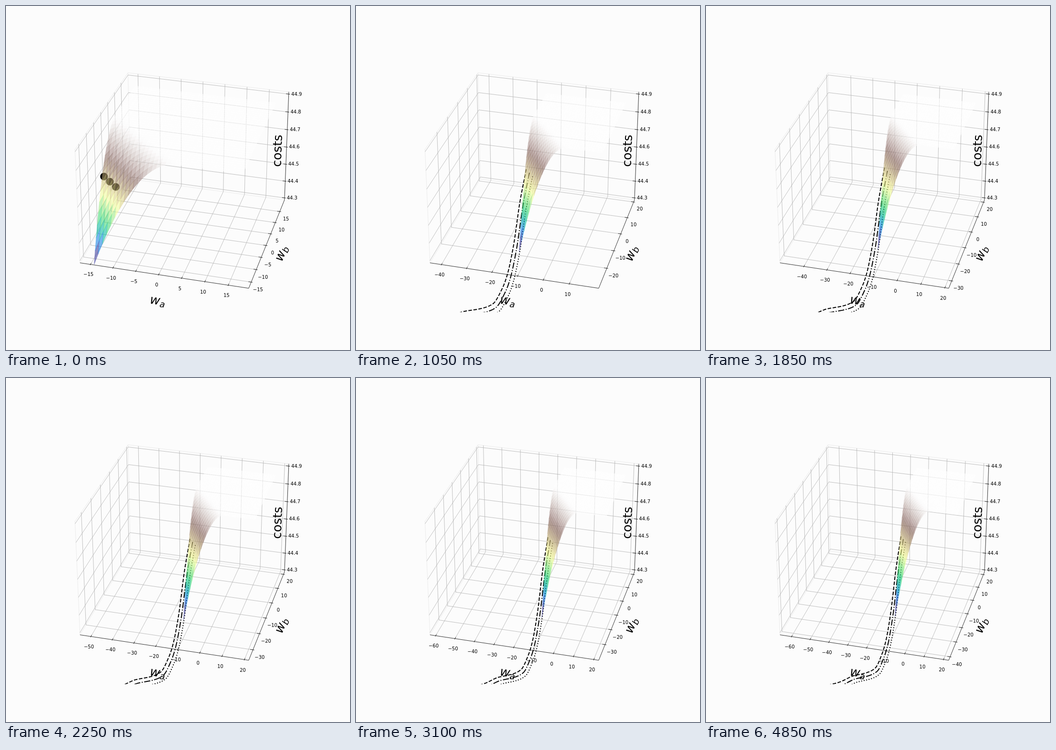
An HTML page with a canvas that plays this animation: 720 by 720 pixels, repeating every 4.9 s.

```html
<!DOCTYPE html>
<html lang="en">
<head>
<meta charset="utf-8">
<title>Cost surface</title>
<style>
  html, body { margin: 0; width: 720px; height: 720px; overflow: hidden; background: #fcfcfc; }
  canvas { display: block; }
</style>
</head>
<body>
<canvas id="plot" width="720" height="720"></canvas>
<script>
const ctx = document.getElementById('plot').getContext('2d');
const LOOP = 4900, STEP = 50;

// Box: half sizes of the panes, and full sizes of the data range
const W = 8 / 7, H = 6 / 7, P = W * 25 / 48, Q = H * 25 / 48;
const AZ = -75 * Math.PI / 180, EL = 30 * Math.PI / 180;
const ca = Math.cos(AZ), sa = Math.sin(AZ), ce = Math.cos(EL), se = Math.sin(EL);

function project([x, y, z]) {
  const u = -sa * x + ca * y;
  const v = -ca * se * x - sa * se * y + ce * z;
  const k = 2996.8 / (10 - (ca * ce * x + sa * ce * y + se * z));
  return [376.5 + u * k, 356.1 - v * k];
}

// Monotone cubic interpolation
function spline(xs, ys) {
  const n = xs.length;
  const d = xs.slice(1).map((x, i) => (ys[i + 1] - ys[i]) / (x - xs[i]));
  const m = xs.map((_, i) => {
    if (i === 0) return d[0];
    if (i === n - 1) return d[n - 2];
    const a = d[i - 1], b = d[i];
    return a * b > 0 ? 2 * a * b / (a + b) : 0;
  });
  return x => {
    let i = 0;
    while (i < n - 2 && x > xs[i + 1]) i++;
    const h = xs[i + 1] - xs[i], t = (x - xs[i]) / h, r = 1 - t;
    return ys[i] * (1 + 2 * t) * r * r + ys[i + 1] * (3 - 2 * t) * t * t
      + h * t * r * (m[i] * r - m[i + 1] * t);
  };
}

// Descent: how far along, and the track as functions of distance in -wa
const travel = spline(
  [0, 100, 200, 300, 500, 750, 1050, 1850, 2250, 3100, 3900, 4850],
  [14.5, 17, 20.5, 25, 31.5, 36.5, 40.4, 45.85, 50.2, 57.5, 59.4, 60.6]);
const way = [14.5, 16.5, 18.5, 20.5, 22, 25, 28.7, 36, 42, 50.2, 57.5, 59.4, 60.6];
const trackY = spline(way,
  [-7.8, -9.6, -11.5, -13.5, -15, -17.5, -19, -20.7, -25.2, -29, -32.6, -33.45, -34.6]);
const trackZ = spline(way,
  [.085, -.164, -.5, -.73, -.826, -.932, -.96, -.987, -1, -1.01, -1.015, -1.018, -1.02]);
const DASHES = [[7.4, 3.2], [12.8, 3.2, 2, 3.2], [2, 3.3]];
const GAP = [1.85, -1.8];

const X0 = -15, X1 = 17, Y0 = -15, Y1 = 18, Z_LOW = 44.317, Z_TOP = 44.87;
const cost = (x, y) => Z_TOP - .617 * Math.max(0, (-x - y - 12) / 18) ** 1.93;
const boxZ = z => (z - 44.6) / .6 * H;

const TERRAIN = [[0, 51, 51, 153], [.15, 0, 153, 255], [.25, 0, 204, 102],
  [.5, 255, 255, 153], [.75, 128, 92, 84], [1, 255, 255, 255]];
function terrain(f) {
  f = Math.min(1, Math.max(0, f));
  let i = 0;
  while (i < 4 && f > TERRAIN[i + 1][0]) i++;
  const a = TERRAIN[i], b = TERRAIN[i + 1], t = (f - a[0]) / (b[0] - a[0]);
  return `rgb(${[1, 2, 3].map(j => Math.round(a[j] + (b[j] - a[j]) * t))})`;
}

// Data range with a 5% margin on both sides
function axis(min, max) {
  const pad = (max - min) * .05, lo = min - pad, hi = max + pad;
  const step = hi - lo > 45 ? 10 : 5, ticks = [];
  for (let v = Math.ceil(lo / step) * step; v <= hi; v += step) ticks.push(v);
  return { ticks, map: v => ((v - lo) / (hi - lo) - .5) * W };
}

function trace(points) {
  ctx.beginPath();
  points.forEach(p => ctx.lineTo(...project(p)));
}

function line(color, width, ...points) {
  ctx.strokeStyle = color;
  ctx.lineWidth = width;
  trace(points);
  ctx.stroke();
}

const grid = (...points) => line('#b0b0b0', .8, ...points);
const mark = (...points) => line('#000', .8, ...points);

function tickLabel(text, p) {
  const [x, y] = project(p);
  ctx.fillText(text, x, y + 7.8);
}

function drawAxes(ax, ay) {
  const edge = '#ececec', out = W / 120, inn = W / 60, dw = .0474, dh = .0356;
  line(edge, 1, [-P, -P, -Q], [-P, -P, Q], [-P, P, Q], [P, P, Q]);
  line(edge, 1, [-P, -P, -Q], [-P, P, -Q], [P, P, -Q]);
  line(edge, 1, [-P, P, -Q], [-P, P, Q]);

  const zTicks = [...Array(7).keys()].map(i => 44.3 + i / 10);
  ax.ticks.map(ax.map).forEach(s => grid([s, -P, -Q], [s, P, -Q], [s, P, Q]));
  ay.ticks.map(ay.map).forEach(t => grid([P, t, -Q], [-P, t, -Q], [-P, t, Q]));
  zTicks.map(boxZ).forEach(z => grid([P, P, z], [-P, P, z], [-P, -P, z]));

  mark([-P, -P, -Q], [P, -P, -Q]);
  mark([P, -P, -Q], [P, P, -Q]);
  mark([P, P, -Q], [P, P, Q]);

  ctx.fillStyle = '#000';
  ctx.textAlign = 'center';
  ctx.font = '10px "DejaVu Sans", sans-serif';
  const name = v => String(v).replace('-', '\u2212');
  for (const v of ax.ticks) {
    const s = ax.map(v);
    mark([s, -P + inn, -Q], [s, -P - out, -Q]);
    tickLabel(name(v), [s, -P - dw, -Q - dh]);
  }
  for (const v of ay.ticks) {
    const t = ay.map(v);
    mark([P - inn, t, -Q], [P + out, t, -Q]);
    tickLabel(name(v), [P + dw, t, -Q - dh]);
  }
  for (const v of zTicks) {
    const z = boxZ(v);
    mark([P - inn, P, z], [P + out, P, z]);
    tickLabel(v.toFixed(1), [P + dw, P + dw, z]);
  }
}

function turned(x, y, degrees, draw) {
  ctx.save();
  ctx.translate(x, y);
  ctx.rotate(degrees * Math.PI / 180);
  draw();
  ctx.restore();
}

function weight(sub, x, y, degrees) {
  turned(x, y, degrees, () => {
    ctx.textAlign = 'left';
    ctx.font = 'italic 26px "DejaVu Sans", sans-serif';
    ctx.fillText('w', -16, 6);
    ctx.font = 'italic 18.2px "DejaVu Sans", sans-serif';
    ctx.fillText(sub, 5.3, 10);
  });
}

function drawNames() {
  weight('a', 317, 619, 8.4);
  weight('b', 578, 519, -67.7);
  turned(567.5, 303, -87.7, () => {
    ctx.textAlign = 'center';
    ctx.font = '26px "DejaVu Sans", sans-serif';
    ctx.fillText('costs', 0, 9);
  });
}

function drawTracks(ax, ay, head) {
  const at = (d, i) =>
    [ax.map(-d + i * GAP[0]), ay.map(trackY(d) + i * GAP[1]), trackZ(d)];
  DASHES.forEach((dash, i) => {
    const points = [];
    for (let k = 0; k <= 120; k++) points.push(at(14.5 + (head - 14.5) * k / 120, i));
    ctx.setLineDash(dash);
    line('#000', 2, ...points);
    ctx.setLineDash([]);
    ctx.beginPath();
    ctx.arc(...project(at(head, i)), 8, 0, 7);
    ctx.fill();
  });
}

function drawSurface(ax, ay) {
  ctx.globalAlpha = .55;
  ctx.lineWidth = .5;
  ctx.lineJoin = 'round';
  for (let y = Y1 - 1; y >= Y0; y--) {
    for (let x = X0; x < X1; x++) {
      const quad = [[x, y], [x + 1, y], [x + 1, y + 1], [x, y + 1]]
        .map(([a, b]) => [a, b, cost(a, b)]);
      const mean = quad.reduce((sum, c) => sum + c[2], 0) / 4;
      ctx.fillStyle = ctx.strokeStyle = terrain((mean - Z_LOW) / (Z_TOP - Z_LOW));
      trace(quad.map(([a, b, c]) => [ax.map(a), ay.map(b), boxZ(c)]));
      ctx.closePath();
      ctx.fill();
      ctx.stroke();
    }
  }
}

function draw(time) {
  const head = travel(time);
  const ax = axis(Math.min(X0, -head), X1);
  const ay = axis(Math.min(Y0, trackY(head) + 2 * GAP[1]), Y1);
  ctx.fillStyle = '#fcfcfc';
  ctx.fillRect(0, 0, 720, 720);
  drawAxes(ax, ay);
  drawNames();
  ctx.save();
  ctx.beginPath();
  ctx.rect(91.8, 86.4, 554.4, 554.4);
  ctx.clip();
  drawTracks(ax, ay, head);
  drawSurface(ax, ay);
  ctx.restore();
}

let shown = -1;
const start = performance.now();
function tick() {
  const time = Math.floor((performance.now() - start) % LOOP / STEP) * STEP;
  if (time !== shown) draw(shown = time);
  requestAnimationFrame(tick);
}
tick();
</script>
</body>
</html>
```
